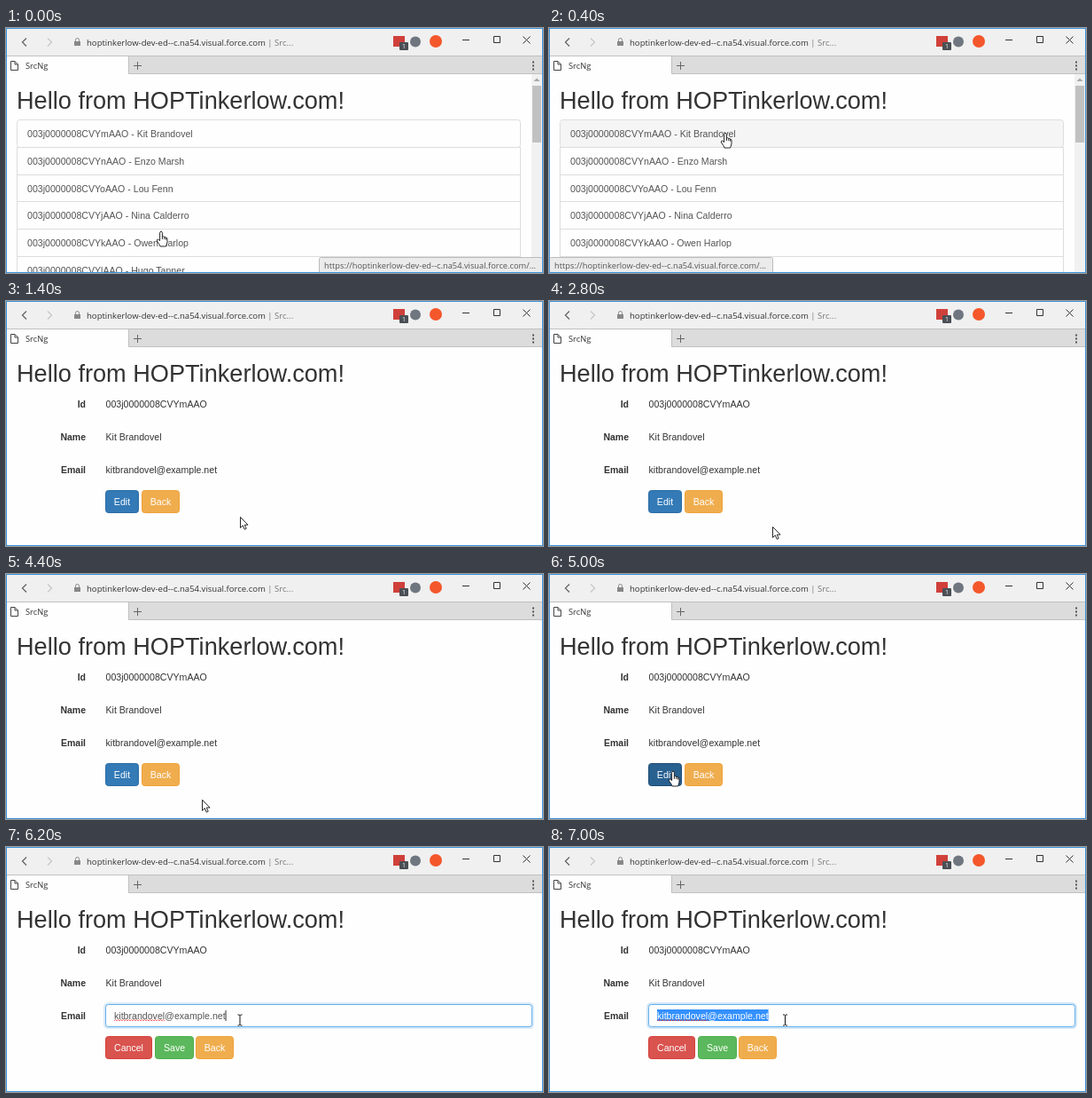
These frames come from a looping animation (606 px wide and 276 px high, 8000 ms). An HTML page:

```html
<!DOCTYPE html>
<html lang="en">
<head>
<meta charset="utf-8">
<title>SrcNg</title>
<style>
  html, body { margin: 0; width: 100%; height: 100%; overflow: hidden; background: #fefefe; }
  svg { display: block; }
  text { font: 10.6px "Liberation Sans", Arial, sans-serif; fill: #333; white-space: pre; }
  .ui { font: 9.3px "Open Sans", sans-serif; }
  .title { font-size: 27.15px; }
  .label { font-size: 10.5px; font-weight: bold; text-anchor: end; }
  .button { fill: #fff; text-anchor: middle; }
  .muted { fill: #555; }
</style>
</head>
<body>
<svg width="606" height="276" viewBox="0 0 606 276">
  <defs>
    <path id="arrow" d="M.5 .5V12.5L3.3 9.9L5.2 14.3L7.2 13.4L5.3 9.2H9Z" fill="#fff" stroke="#111" stroke-width=".9"/>
    <g id="hand" stroke="#111" stroke-width=".9" stroke-linejoin="round">
      <path d="M-1.4 10.6V1.6Q-1.3 .4 0 .4T1.4 1.6V6Q2.8 5.2 3.8 6.5Q5 5.9 5.6 7.2Q7 7 7 8.5V12Q7 13.5 5.5 17H-1Q-1.5 15-4.6 11Q-5 9-3.5 9Z" fill="#fff"/>
      <path d="M1.4 6V9M3.8 6.5V9.2M5.6 7.2V9.6" fill="none"/>
    </g>
    <path id="beam" d="M-2.5-6H-.8L0-5.2L.8-6H2.5M0-5.2V5.2M-2.5 6H-.8L0 5.2L.8 6H2.5" fill="none" stroke="#111"/>
  </defs>

  <rect width="606" height="276" fill="#fefefe"/>
  <g id="page"></g>

  <rect width="606" height="32" fill="#f0f0f0"/>
  <g fill="none" stroke="#666" stroke-width="1.3">
    <path d="M23 11.5L18.5 16L23 20.5"/>
    <path d="M47 11.5L51.5 16L47 20.5" stroke="#c8c8c8"/>
    <path d="M78.5 15V13.5a2 2 0 0 1 4 0V15" stroke="#888" stroke-width="1"/>
    <path d="M515 13.5H523M550.5 9.5H557.5V16.5H550.5ZM583.5 9.5L591.5 17.5M591.5 9.5L583.5 17.5" stroke="#333" stroke-width="1"/>
  </g>
  <rect x="77" y="15" width="7" height="5" fill="#888"/>
  <text class="ui" x="91" y="20" style="font-size:9.55px">hoptinkerlow-dev-ed--c.na54.visual.force.com<tspan fill="#777"> | Src...</tspan></text>
  <rect x="437" y="9" width="13" height="12" fill="#d0403a"/>
  <rect x="444" y="16" width="10" height="9" rx="1" fill="#4a4f55"/>
  <text class="ui" x="447" y="23.2" style="font-size:7px;fill:#fff">1</text>
  <circle cx="462" cy="15.5" r="6" fill="#6f7680"/>
  <circle cx="485" cy="15" r="7" fill="#f4572b"/>

  <rect y="32" width="606" height="20" fill="#dcdcdc"/>
  <rect x="1" y="32" width="137" height="20" fill="#fefefe"/>
  <path d="M0 31.5H606M138.5 32V51.5H606" fill="none" stroke="#c0c0c0"/>
  <path d="M5.5 37.5H10L13.5 41V47.5H5.5ZM10 37.5V41H13.5" fill="none" stroke="#444"/>
  <path d="M144 42.5H153M148.5 38V47" stroke="#666"/>
  <text class="ui" x="22" y="46">SrcNg</text>
  <path d="M595 37.5v2M595 41.5v2M595 45.5v2" stroke="#555" stroke-width="2"/>
  <rect x=".5" y=".5" width="605" height="275" fill="none" stroke="#3f93d8"/>
  <use id="cursor"/>
</svg>
<script>
const LOOP = 8000, STEP = 200;
const people = ['m Kit Brandovel', 'n Enzo Marsh', 'o Lou Fenn', 'j Nina Calderro', 'k Owen Harlop', 'l Hugo Tanner'];
const recordId = letter => `003j0000008CVY${letter}AAO`;
const user = 'kitbrandovel', host = 'example.net', email = `${user}@${host}`;
const status = 'https://hoptinkerlow-dev-ed--c.na54.visual.force.com/...';

// start time, shape, x, y
const moves = [
  [0, 'hand', 175, 229], [200, 'hand', 188, 170], [400, 'hand', 199, 118],
  [1000, 'arrow', 220, 165], [1200, 'arrow', 252, 225], [1400, 'arrow', 264, 243],
  [1800, 'arrow', 263, 244], [2000, 'arrow', 261, 245],
  [2400, 'arrow', 258, 248], [2600, 'arrow', 254, 252], [2800, 'arrow', 252, 254],
  [3200, 'arrow', 251, 256], [3400, 'arrow', 249, 259], [3600, 'arrow', 248, 261],
  [4400, 'arrow', 221, 254], [4600, 'arrow', 190, 246], [4800, 'hand', 146, 227],
  [5000, 'hand', 140, 222], [5400, 'hand', 140, 221],
  [5600, 'arrow', 215, 207], [5800, 'beam', 264, 195], [6400, 'beam', 266.5, 195]
];

const page = document.getElementById('page'), cursor = document.getElementById('cursor');
const ruler = document.createElement('canvas').getContext('2d');
ruler.font = '10.6px "Liberation Sans", Arial, sans-serif';
const widthOf = s => ruler.measureText(s).width;

const text = (x, y, s, cls = '') => `<text x="${x}" y="${y}" class="${cls}">${s}</text>`;
const rect = (x, y, w, h, fill, more = '') => `<rect x="${x}" y="${y}" width="${w}" height="${h}" fill="${fill}" ${more}/>`;
const button = (x, w, label, fill, edge) =>
  rect(x, 213.5, w, 25, fill, `rx="3" stroke="${edge}"`) + text(x + w / 2, 230, label, 'button');

function statusBar(x, opacity = 1) {
  return `<g opacity="${opacity}">` + rect(x, 258.5, 252, 20, '#ebebeb', 'rx="2" stroke="#bbb"') +
    text(x + 5.5, 271, status, 'ui muted') + '</g>';
}

function list(t, pointerY) {
  const top = 103, pitch = 30.75;
  const hovered = t < 200 ? -1 : Math.floor((pointerY - top) / pitch);
  const rows = people.map((entry, i) => {
    const y = top + i * pitch;
    return rect(12.5, Math.round(y) + .5, 568, 31, i === hovered ? '#f5f5f5' : '#fefefe',
      `stroke="#ddd" rx="${i ? 0 : 3}"`) +
      text(24, y + 20, `${recordId(entry[0])} - ${entry.slice(2)}`, 'muted');
  });
  return rows.join('') + rect(593, 52, 12, 224, '#f1f1f1') + rect(594, 65, 10, 64, '#c1c1c1') +
    '<path d="M595.5 60L599 56.5L602.5 60Z" fill="#a8a8a8"/>';
}

function emailField(t) {
  const x = 122, split = widthOf(user + '@'), full = widthOf(email);
  const focus = t < 6200 ? 0 : t < 6400 ? .8 : 1;
  const from = t >= 7000 ? 0 : t >= 6800 ? split : full;
  const box = (grow, stroke, more = '') =>
    rect(112.5 - grow, 177.5 - grow, 481 + 2 * grow, 25 + 2 * grow, 'none', `rx="${3 + grow}" stroke="${stroke}" ${more}`);
  let out = '';
  if (focus) out += box(1, '#66afe9', `stroke-width="3" stroke-opacity="${.3 * focus}"`);
  out += box(0, focus ? '#66afe9' : '#ccc');
  if (from < full) out += rect(x + from, 183, full - from, 13, '#3390ff');
  const ink = start => start >= from ? '#fff' : '#555';
  out += text(x, 194, `<tspan fill="${ink(0)}">${user}@</tspan><tspan fill="${ink(split)}">${host}</tspan>`);
  if (focus) {
    const waves = Math.floor(widthOf(user) / 3);
    out += `<path d="M${x} 196${'l1.5-1.5l1.5 1.5'.repeat(waves)}" fill="none" stroke="#e33" stroke-width=".7"/>`;
    if (from === full) out += rect(x + full, 184, .9, 12, '#222');
  }
  return out;
}

function form(t) {
  const editing = t >= 5200, loaded = t >= 1000;
  let out = text(90, 120, 'Id', 'label') + text(90, 157, 'Name', 'label') + text(90, 194, 'Email', 'label');
  if (loaded) out += text(112.5, 120, recordId('m')) + text(112.5, 157, people[0].slice(2));
  if (editing) {
    const hot = t >= 5400 && t < 5600;
    out += emailField(t) +
      button(112.5, 52, 'Cancel', hot ? '#c9302c' : '#d9534f', hot ? '#ac2925' : '#d43f3a') +
      button(168.5, 43, 'Save', '#5cb85c', '#4cae4c') +
      button(214.5, 42, 'Back', '#f0ad4e', '#eea236');
  } else {
    const hot = t >= 4800;
    out += (loaded ? text(112.5, 194, email) : '') +
      button(112.5, 37, 'Edit', hot ? '#286090' : '#337ab7', hot ? '#204d74' : '#2e6da4') +
      button(153.5, 42, 'Back', '#f0ad4e', '#eea236');
  }
  return out;
}

function draw(t) {
  const [, shape, x, y] = moves.findLast(m => m[0] <= t);
  let out = text(12, 91, 'Hello from HOPTinkerlow.com!', 'title');
  out += t < 800 ? list(t, y) : form(t);
  if (t < 200) out += statusBar(353.5);
  else if (t < 1400) out += statusBar(.5, t < 1200 ? 1 : .5);
  page.innerHTML = out;
  cursor.setAttribute('href', '#' + shape);
  cursor.setAttribute('transform', `translate(${x} ${y})`);
}

let shown = -1;
function tick() {
  const t = Math.floor(performance.now() % LOOP / STEP) * STEP;
  if (t !== shown) draw(shown = t);
  requestAnimationFrame(tick);
}
tick();
</script>
</body>
</html>
```
